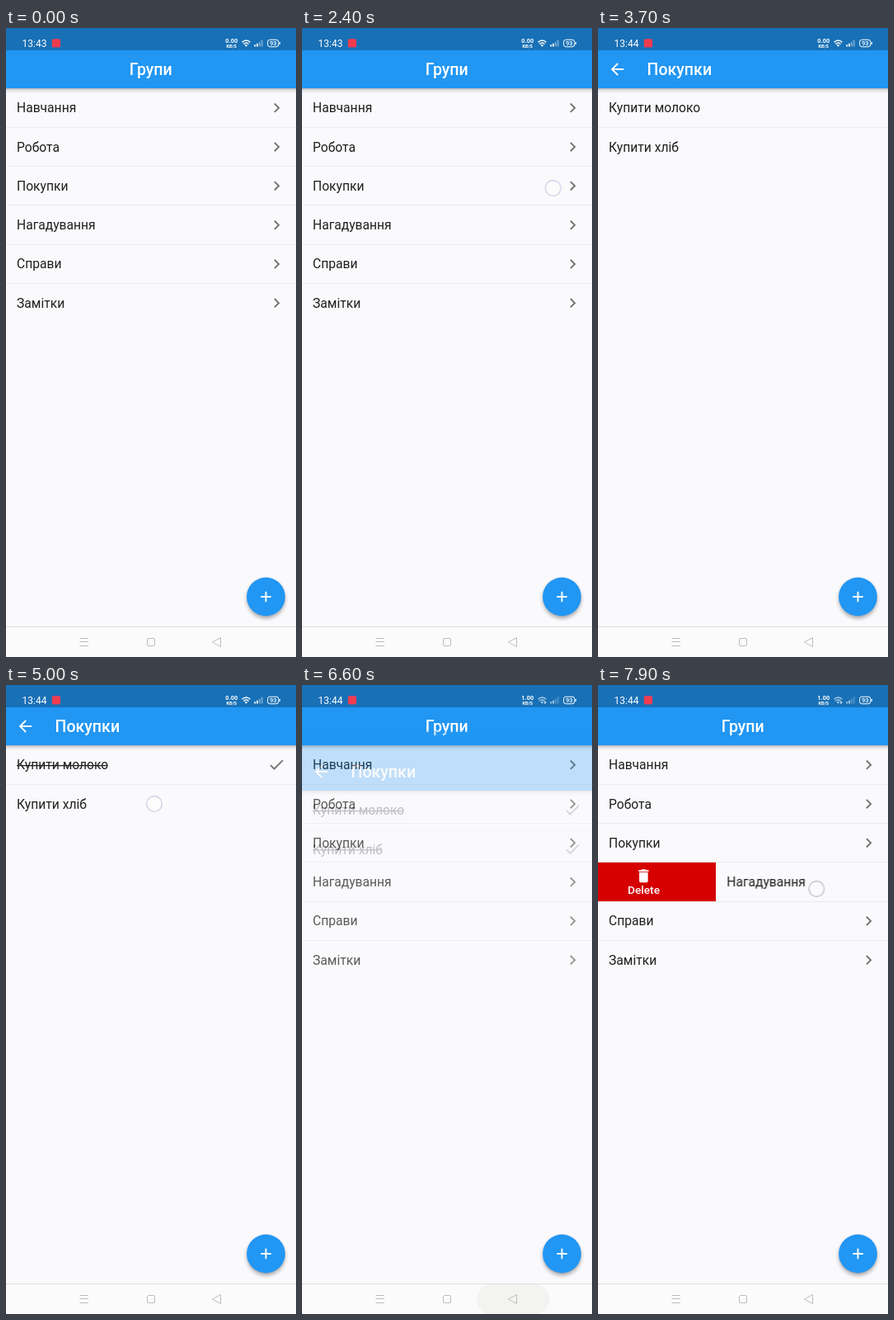
Write an HTML page that moves like this. It is 352x762 px and loops after 8 s.

```html
<!DOCTYPE html>
<html lang="uk">
<head>
<meta charset="utf-8">
<title>Групи</title>
<style>
html, body { margin: 0; width: 100%; height: 100%; overflow: hidden; background: #faf9fb; }
svg { display: block; width: 352px; height: 762px; font-family: Roboto, sans-serif; }

.bg { fill: #faf9fb; }
.blue { fill: #2196f3; }
.title { font-size: 19.55px; font-weight: 500; fill: #fff; }
.row { font-size: 15.65px; fill: #1f1f20; }
.line { stroke: #ebeaec; }
.mark { fill: #757575; }
.strike { stroke: #222; stroke-width: 1.1; }
.white { fill: #fff; }
.nav { fill: none; stroke: #bdbdbd; stroke-width: 1; stroke-linejoin: round; }
.touch { fill: rgba(255,255,255,.55); stroke: #cbc9e4; stroke-width: 1.2; }

/* 8 s loop, the picture holds for 100 ms at a time (1.25 %) */
.a { animation: 8s step-end infinite; }
.tasks { animation-name: tasks; }
.touch { animation-name: touch; }
.done1 { animation-name: done1; }
.done2 { animation-name: done2; }
.drag { animation-name: drag; }
.bin { animation-name: bin; }
.t43 { animation-name: t43; }
.t44 { animation-name: t44; }
.s0 { animation-name: s0; }
.s1 { animation-name: s1; }
.press { animation-name: press; }
.weak { animation-name: weak; }
.arrows { animation-name: arrows; }

@keyframes tasks {
  0% { opacity: 0; transform: translateY(190px); }
  32.5% { opacity: .16; transform: translateY(104px); }
  33.75% { opacity: .51; transform: translateY(14.6px); }
  35% { opacity: 1; transform: none; }
  81.25% { opacity: .65; transform: translateY(6.4px); }
  82.5% { opacity: .27; transform: translateY(55px); }
  83.75% { opacity: .02; transform: translateY(182px); }
  85%, 100% { opacity: 0; transform: translateY(190px); }
}
@keyframes touch {
  0% { opacity: 0; transform: translate(304.7px, 194px); }
  30% { opacity: 1; transform: translate(304.7px, 194px); }
  32.5% { opacity: 0; transform: translate(180px, 95px); }
  53.75% { opacity: 1; transform: translate(180px, 95px); }
  56.25% { opacity: 0; transform: translate(180px, 144px); }
  62.5% { opacity: 1; transform: translate(180px, 144px); }
  65% { opacity: 0; transform: translate(257px, 749px); }
  78.75% { opacity: 1; transform: translate(257px, 749px); stroke: #bcbcc4; fill: transparent; }
  80% { opacity: 0; transform: translate(118px, 229px); }
  92.5% { opacity: 1; transform: translate(118px, 229px); }
  93.75% { opacity: 1; transform: translate(122px, 230px); }
  95% { opacity: 1; transform: translate(158px, 234px); }
  96.25% { opacity: 1; transform: translate(193px, 239px); }
  97.5% { opacity: 1; transform: translate(229px, 243px); }
  98.75%, 100% { opacity: 1; transform: translate(265.3px, 247px); }
}
@keyframes drag {
  0% { transform: none; }
  95% { transform: translateX(36px); }
  96.25% { transform: translateX(71px); }
  97.5% { transform: translateX(107px); }
  98.75%, 100% { transform: translateX(143.3px); }
}
@keyframes bin { 0% { opacity: 0; } 95%, 100% { opacity: 1; } }
@keyframes done1 { 0% { opacity: 0; } 56.25%, 100% { opacity: 1; } }
@keyframes done2 { 0% { opacity: 0; } 65%, 100% { opacity: 1; } }
@keyframes t43 { 0% { opacity: 1; } 46.25%, 100% { opacity: 0; } }
@keyframes t44 { 0% { opacity: 0; } 46.25%, 100% { opacity: 1; } }
@keyframes s0 { 0% { opacity: 1; } 68.75%, 100% { opacity: 0; } }
@keyframes s1 { 0% { opacity: 0; } 68.75%, 100% { opacity: 1; } }
@keyframes press {
  0% { opacity: 0; }
  80% { opacity: .4; }
  81.25% { opacity: 1; }
  83.75% { opacity: .5; }
  85%, 100% { opacity: 0; }
}
@keyframes weak { 0% { opacity: 1; } 82.5%, 100% { opacity: .65; } }
@keyframes arrows { 0% { opacity: 0; } 82.5%, 100% { opacity: 1; } }
</style>
</head>
<body>
<svg viewBox="0 0 352 762" width="352" height="762">
  <defs>
    <linearGradient id="shade" x2="0" y2="1">
      <stop stop-opacity=".28"/>
      <stop offset=".4" stop-opacity=".1"/>
      <stop offset="1" stop-opacity="0"/>
    </linearGradient>
    <filter id="blur" x="-30%" y="-30%" width="160%" height="160%">
      <feGaussianBlur stdDeviation="2.6"/>
    </filter>
    <g id="bar">
      <rect y="73" width="352" height="6" fill="url(#shade)"/>
      <rect class="blue" width="352" height="73"/>
    </g>
    <path id="next" class="mark" transform="translate(316.8 -11.7) scale(.978)"
      d="M10 6 8.59 7.41 13.17 12l-4.58 4.59L10 18l6-6z"/>
    <path id="check" class="mark" transform="translate(317.2 -11.4) scale(.93)"
      d="M9 16.17 4.83 12l-1.42 1.41L9 19 21 7l-1.41-1.41z"/>
  </defs>

  <!-- group list -->
  <g>
    <rect class="bg" width="352" height="762"/>
    <g class="row">
      <text x="13" y="102.2">Навчання</text>
      <text x="13" y="149.5">Робота</text>
      <text x="13" y="196.8">Покупки</text>
      <text x="13" y="291.4">Справи</text>
      <text x="13" y="338.7">Замітки</text>
    </g>
    <use href="#next" y="96.7"/>
    <use href="#next" y="144"/>
    <use href="#next" y="191.3"/>
    <use href="#next" y="285.9"/>
    <use href="#next" y="333.2"/>
    <g class="a bin">
      <rect y="215" width="352" height="47" fill="#d60000"/>
      <path class="white" transform="translate(44.8 220.7) scale(.88)"
        d="M6 19c0 1.1.9 2 2 2h8c1.1 0 2-.9 2-2V7H6v12zM19 4h-3.5l-1-1h-5l-1 1H5v2h14V4z"/>
      <text class="white" x="55.5" y="252.6" text-anchor="middle" font-size="13.7" font-weight="500">Delete</text>
    </g>
    <g class="a drag">
      <rect class="bg" y="215" width="352" height="47"/>
      <text class="row" x="13" y="244.1">Нагадування</text>
      <use href="#next" y="238.6"/>
    </g>
    <path class="line" d="M0 120.5h352M0 167.5h352M0 214.5h352M0 262.5h352M0 309.5h352"/>
    <use href="#bar"/>
    <text class="title" x="175.7" y="56.6" text-anchor="middle">Групи</text>
  </g>

  <!-- task list -->
  <g class="a tasks">
    <rect class="bg" width="352" height="762"/>
    <text class="row" x="13" y="102.2">Купити молоко</text>
    <text class="row" x="13" y="149.5">Купити хліб</text>
    <g class="a done1">
      <path class="strike" d="M13 97.6h109"/>
      <use href="#check" y="96.7"/>
    </g>
    <g class="a done2">
      <path class="strike" d="M13 144.9h83.5"/>
      <use href="#check" y="144"/>
    </g>
    <path class="line" d="M0 120.5h352"/>
    <use href="#bar"/>
    <path class="white" transform="translate(11.9 38.5) scale(.96)"
      d="M20 11H7.83l5.59-5.59L12 4l-8 8 8 8 1.41-1.41L7.83 13H20z"/>
    <text class="title" x="59.5" y="56.6">Покупки</text>
  </g>

  <!-- add button -->
  <circle cx="315.5" cy="692" r="23" opacity=".36" filter="url(#blur)"/>
  <circle class="blue" cx="315.5" cy="689" r="23.4"/>
  <path d="M309.3 689h12.4M315.5 682.8v12.4" stroke="#fff" stroke-width="1.9"/>

  <!-- status bar -->
  <rect width="352" height="27" opacity=".25"/>
  <g class="white">
    <g font-size="12">
      <text class="a t43" x="19.5" y="22.7">13:43</text>
      <text class="a t44" x="19.5" y="22.7">13:44</text>
    </g>
    <rect x="55.8" y="13.2" width="10.2" height="10.2" rx="2" fill="#f03b50"/>
    <g font-size="7.4" font-weight="700" text-anchor="middle">
      <text class="a s0" x="273.8" y="18.3">0.00</text>
      <text class="a s1" x="273.8" y="18.3">1.00</text>
      <text x="273.8" y="24.2" font-size="5.5">KB/S</text>
    </g>
    <g class="a weak">
      <path d="M286.5 17.3q5-4.6 10 0M288.3 19.4q3.2-2.8 6.4 0" fill="none" stroke="#fff" stroke-width="1.3"/>
      <path d="M289.7 20.7q1.8-1.3 3.6 0l-1.8 2z"/>
      <path d="M301.4 20.2h1.8v2.3h-1.8zM304.2 18.7h1.8v3.8h-1.8z"/>
      <path d="M307 16.7h1.8v5.8H307zM309.8 14.5h1.8v8h-1.8z" opacity=".4"/>
    </g>
    <path class="a arrows" d="M293.6 20.6h3l-1.5 2.4z"/>
    <rect x="317.5" y="14.2" width="13.4" height="8.6" rx="3" fill="none" stroke="#fff"/>
    <path d="M331.6 17h1.2v3h-1.2z"/>
    <text x="324.2" y="21.3" font-size="7.6" font-weight="500" text-anchor="middle">93</text>
  </g>

  <!-- navigation bar -->
  <rect y="725" width="352" height="37" fill="#fbfbfb"/>
  <path d="M0 725.5h352" stroke="#dedede"/>
  <path class="a press" d="M224 726h64q13 8 13 18t-13 18h-64q-12-8-12-18t12-18z" fill="#f3f3f2"/>
  <g class="nav">
    <path d="M89.5 739.5h10.5M89.5 743.5h10.5M89.5 748.5h10.5"/>
    <rect x="171.5" y="739.5" width="9" height="9" rx="1.5"/>
    <path d="M250.5 744l10-5.5v11z"/>
  </g>

  <circle class="a touch" r="9.3"/>
</svg>
</body>
</html>
```
